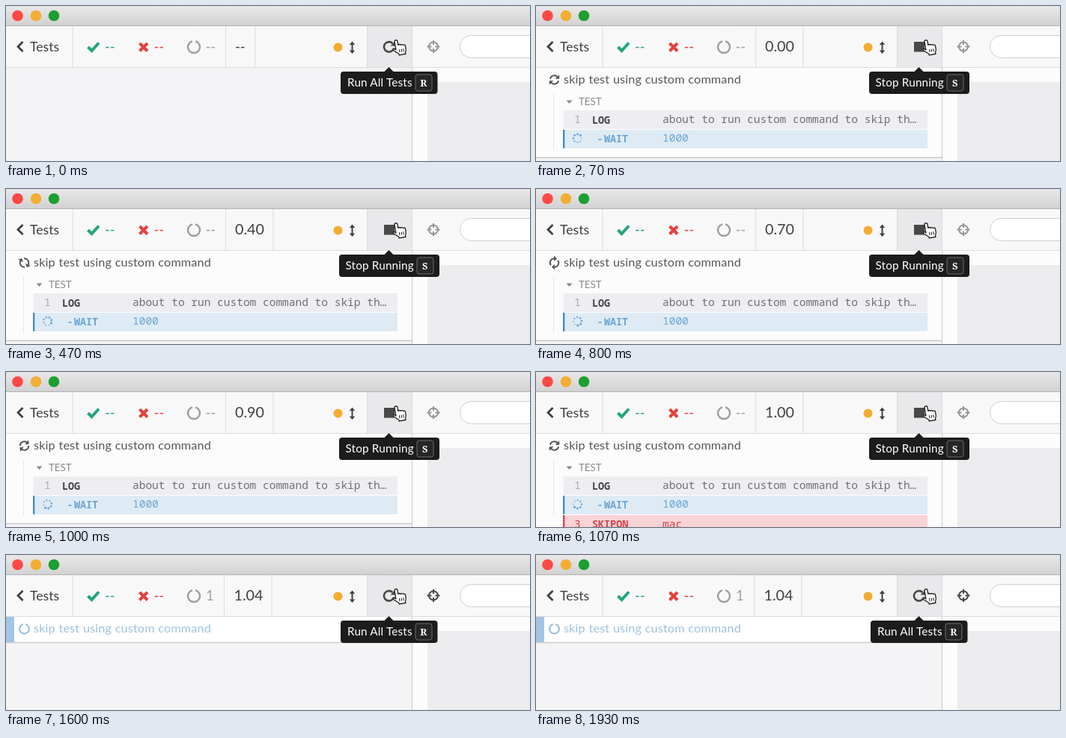
Animation, 700 px wide and 208 px high, one loop 1.99 s. Source, as an HTML page:

```html
<!DOCTYPE html>
<html lang="en">
<head>
<meta charset="utf-8">
<title>Test runner</title>
<style>
  html, body { margin: 0; width: 100%; height: 100%; overflow: hidden; }
  svg { display: block; width: 700px; height: 208px; }
  text { font: 17.7px Lato, sans-serif; fill: #404040; white-space: pre; }
  .title { font-size: 16.2px; letter-spacing: .15px; word-spacing: .4px; }
  .count { font-size: 18.5px; }
  .time { font-size: 19.7px; }
  .tip text { font-size: 15.3px; letter-spacing: .15px; fill: #fff; }
  .tip .key { font: 900 13px "Noto Serif", serif; text-anchor: middle; }
  .key-box { fill: #262626; stroke: #6a6a6a; }
  .log text { font: 14.5px "Noto Sans Mono", monospace; fill: #707070; }
  .log .name { font-size: 13.4px; font-weight: 600; fill: #444; }
  .log .num { fill: #aaa; }
  .log .wait text { fill: #6ba5d3; }
  .log .fail text { fill: #d5434b; }
  .line { fill: none; stroke: #dcdbdd; }
</style>
</head>
<body>
<svg viewBox="0 0 700 208">
  <defs>
    <linearGradient id="bar" x2="0" y2="1">
      <stop stop-color="#e9e8e9"/><stop offset="1" stop-color="#d3d2d3"/>
    </linearGradient>
    <path id="notch" d="M2-7.7A8 8 0 1 1-2-7.7" fill="none" stroke-width="2.4"/>
    <g id="arrow">
      <path d="M-5.6-1.2A5.7 5.7 0 0 1 4.2-3.9" fill="none" stroke="#555" stroke-width="1.9"/>
      <path d="M6.7-6.7V-1.2H1.2z" fill="#555"/>
    </g>
  </defs>

  <rect width="700" height="208" fill="#f4f3f5"/>
  <rect y="27" width="700" height="55" fill="#f9f8f9"/>
  <rect x="543" y="83" width="157" height="125" fill="#fdfcfd"/>
  <rect x="563" y="102" width="137" height="106" fill="#ecebed"/>
  <rect width="700" height="26" fill="url(#bar)"/>
  <path d="M0 26.5H700" stroke="#b3b2b3"/>
  <circle cx="15.5" cy="13" r="7.3" fill="#fc4946"/>
  <circle cx="40" cy="13" r="7.3" fill="#f2ae34"/>
  <circle cx="64" cy="13" r="7.3" fill="#1d9f31"/>

  <rect x="483" y="27" width="59" height="55" fill="#e9e8ea"/>
  <path class="line" d="M0 82.5H700M89 27V82M482.5 27V82M542.5 27V82"/>
  <path class="line" data-in="idle" d="M293.5 27V82M333 27V82"/>
  <path class="line" data-in="run" d="M293.5 27V82M357 27V82"/>
  <path class="line" data-in="done" d="M291.5 27V82M355 27V82"/>
  <rect x="606.5" y="39.5" width="120" height="30" rx="15" fill="#fff" stroke="#cfced0"/>

  <path d="M22.500 48L16 54.500L22.500 61" fill="none" stroke="#404040" stroke-width="2.8"/>
  <text x="32" y="60.5">Tests</text>
  <path d="M109.500 55L114.500 60L124 49.500" fill="none" stroke="#22a67b" stroke-width="4"/>
  <text x="132" y="61" class="count" style="fill:#22a67b">--</text>
  <path d="M178.500 50L189 60.500M189 50L178.500 60.500" stroke="#e2423f" stroke-width="4"/>
  <text x="197.500" y="61" class="count" style="fill:#e2423f">--</text>
  <use href="#notch" x="251" y="55" stroke="#a0a0a2"/>
  <text x="266.500" y="61" class="count" style="fill:#a0a0a2" data-in="idle run">--</text>
  <text x="267" y="61" class="count" style="fill:#a0a0a2" data-in="done">1</text>
  <text x="306" y="60.5" class="count" data-in="idle">--</text>
  <text x="306" y="61" class="time" id="clock" data-in="run"></text>
  <text x="304.5" y="61" class="time" data-in="done">1.04</text>

  <circle cx="443.5" cy="55.500" r="6" fill="#f5ab31"/>
  <path d="M462.5 51V61" stroke="#404040" stroke-width="2"/>
  <path d="M458.800 52L462.5 47.5L466.200 52zM458.800 59.5L462.5 64L466.200 59.5z" fill="#404040"/>
  <g data-in="idle done">
    <path d="M516.5 50.2A6.7 6.7 0 1 0 518 57" fill="none" stroke="#484848" stroke-width="2.6"/>
    <path d="M520 47V53.5H513.5z" fill="#484848"/>
  </g>
  <rect x="505" y="48" width="14" height="13.5" fill="#484848" data-in="run"/>
  <g id="aim" fill="none" stroke-width="2">
    <circle cx="571" cy="54.5" r="6"/>
    <path d="M571 46V52M571 57V63M562.5 54.5H568.5M573.5 54.5H579.5"/>
  </g>

  <g data-in="run">
    <rect y="83" width="542" height="125" fill="#fdfcfd"/>
    <g id="sync"><use href="#arrow"/><use href="#arrow" transform="rotate(180)"/></g>
    <text x="37" y="104" class="title" style="fill:#555">skip test using custom command</text>
    <path d="M23.5 118V193" stroke="#cfced2" stroke-dasharray="1 1"/>
    <path d="M40.5 126.5H48.5L44.5 131z" fill="#888"/>
    <text x="57" y="132.5" style="font-size:13.300px;fill:#888">TEST</text>
    <g class="log">
      <rect x="36.500" y="140" width="486.500" height="25" fill="#eeedf2"/>
      <text x="51" y="157" class="num">1</text>
      <text x="75" y="157.5" class="name">LOG</text>
      <text x="169" y="157">about to run custom command to skip th…</text>
      <g class="wait">
        <rect x="36.500" y="166" width="486.500" height="25" fill="#deebf5"/>
        <rect x="36" y="166" width="2.300" height="25" fill="#428bc2"/>
        <g id="dots" fill="#6ba5d3"></g>
        <text x="81.5" y="183" class="name">-</text>
        <text x="91" y="183" class="name">WAIT</text>
        <text x="169" y="182">1000</text>
      </g>
      <g class="fail" id="fail">
        <rect x="36.500" y="192" width="486.500" height="25" fill="#f9d4d6"/>
        <rect x="36" y="192" width="2.300" height="25" fill="#d9434b"/>
        <text x="51" y="209">3</text>
        <text x="75" y="209" class="name">SKIPON</text>
        <text x="169" y="208.500">mac</text>
      </g>
    </g>
    <g id="end">
      <rect y="204" width="542" height="4" fill="#f4f3f5"/>
      <path d="M0 203.5H542" stroke="#c6c5c8" stroke-width="1.5"/>
    </g>
  </g>

  <g data-in="done">
    <rect y="83" width="542" height="34" fill="#fff"/>
    <rect y="83" width="11" height="34" fill="#a4c4e4"/>
    <path d="M0 117.5H542" stroke="#cac9cc" stroke-width="1.5"/>
    <use href="#notch" transform="translate(24.5 99) scale(.8)" stroke="#96b9dc"/>
    <text x="37" y="104" class="title" style="fill:#9fc0e0">skip test using custom command</text>
  </g>
  <path d="M542.5 83V208" stroke="#c9c8ca"/>

  <path d="M504.5 89L511.5 82L518.5 89z" fill="#1c1c1c"/>
  <g class="tip" data-in="idle done">
    <rect x="447" y="88" width="129.5" height="30" rx="4" fill="#1c1c1c"/>
    <text x="456" y="108">Run All Tests</text>
    <rect x="547" y="92" width="22" height="22" rx="3" class="key-box"/>
    <text x="558" y="108" class="key">R</text>
  </g>
  <g class="tip" data-in="run">
    <rect x="445" y="88" width="134" height="30" rx="4" fill="#1c1c1c"/>
    <text x="453.5" y="108">Stop Running</text>
    <rect x="549" y="92" width="22" height="22" rx="3" class="key-box"/>
    <text x="560" y="108" class="key">S</text>
  </g>

  <g transform="rotate(-10 526 56)" stroke="#1c1c1c" stroke-linejoin="round">
    <path d="M520.5 58V47q0-2 2-2t2 2V52q2-1.2 3.3.5q2-1 3.2.7q2.8-.6 2.8 2V59q0 2.5-1.5 4V65.5H523.5V64L517.5 58.5q-1-2 .8-2.7z"
          fill="#fff" stroke-width="1.3"/>
    <path d="M525 58V62M527.7 58V62M530.4 58V62"/>
  </g>
</svg>
<script>
const LOOP = 1990, START = 70, FAIL = 1070, STOP = 1130;
const $ = id => document.getElementById(id);
const staged = [...document.querySelectorAll('[data-in]')];
const show = (el, on) => el.style.display = on ? '' : 'none';

for (let i = 0; i < 8; i++) {
  const a = (i + 1) * Math.PI / 4;
  $('dots').innerHTML += `<circle cx="${5.5 * Math.cos(a)}" cy="${5.5 * Math.sin(a)}" r="${.8 + i * .12}"/>`;
}

function draw(now) {
  const t = now % LOOP;
  const phase = t < START ? 'idle' : t < STOP ? 'run' : 'done';
  for (const el of staged) show(el, el.dataset.in.split(' ').includes(phase));

  const turn = (t - START) * .18;
  $('sync').setAttribute('transform', `translate(24.5 99) rotate(${turn})`);
  $('dots').setAttribute('transform', `translate(55.5 177.5) rotate(${turn - 45})`);
  $('clock').textContent = (Math.floor(Math.max(0, t - 20) / 100) / 10).toFixed(2);
  $('aim').setAttribute('stroke', phase === 'done' ? '#484848' : '#969597');
  show($('fail'), t >= FAIL);
  show($('end'), t < FAIL);
  requestAnimationFrame(draw);
}
draw(performance.now());
</script>
</body>
</html>
```
